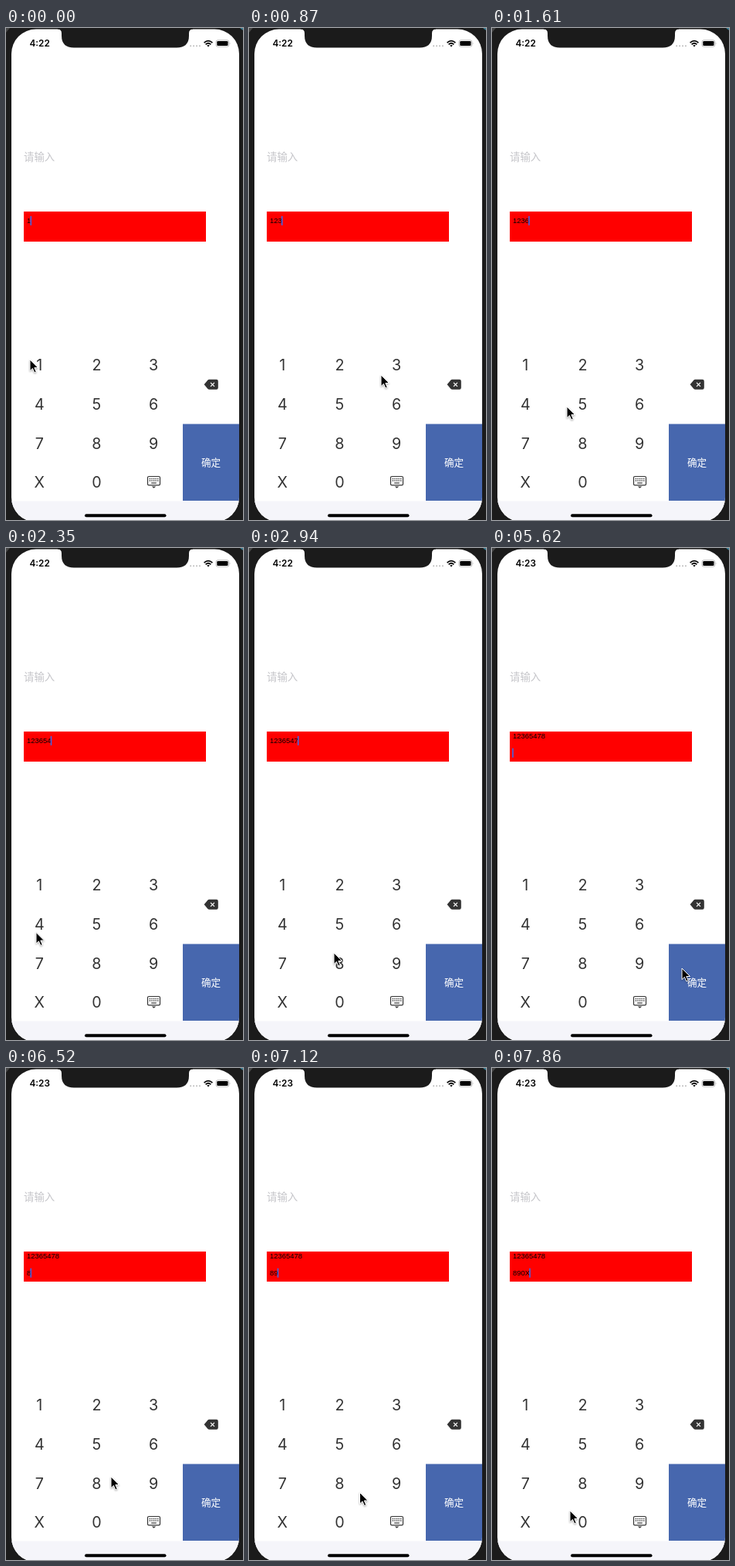
These frames come from a looping animation (307x638 px, 8 s). An HTML page:

```html
<!DOCTYPE html>
<html lang="zh">
<head>
<meta charset="utf-8">
<title>Number keypad</title>
<style>
  html, body { margin: 0; width: 100%; height: 100%; overflow: hidden; background: #1b1b1b; }
  svg { display: block; width: 307px; height: 638px; }
  text { font-family: Inter, Roboto, sans-serif; }
  .cjk { font-family: "Noto Sans CJK SC", "Noto Sans CJK", sans-serif; }
  .key { font-size: 19.7px; fill: #333; text-anchor: middle; }
  .entry { font: 9.44px "Liberation Sans", Arial, sans-serif; }
  #pointer { filter: drop-shadow(0 1px 1px rgba(0, 0, 0, .35)); }
</style>
</head>
<body>
<svg viewBox="0 0 307 638">
  <defs>
    <clipPath id="screen"><rect x="7" y="1.5" width="295" height="639" rx="32"/></clipPath>
    <clipPath id="field"><rect x="23" y="238" width="236" height="39"/></clipPath>
  </defs>

  <path d="M0 0H5L0 6Z" fill="#444"/>
  <path d="M303 0h4v3z" fill="#3a7f95"/>

  <g clip-path="url(#screen)">
    <rect width="307" height="638" fill="#fff"/>
    <rect y="613.5" width="307" height="27" fill="#f5f5fa"/>
    <rect x="229" y="513.5" width="74" height="99.5" fill="#4767ae"/>
  </g>
  <path d="M67 0V1.5Q72 1.5 72 7V10Q72 25.5 88 25.5H221Q237 25.5 237 10V7Q237 1.5 242 1.5V0Z" fill="#1b1b1b"/>

  <!-- status bar -->
  <text id="clock" x="30.5" y="24.2" font-size="11.8" font-weight="600">4:22</text>
  <path d="M239.2 23.2h.01m3.9 0h.01m3.9 0h.01m3.9 0h.01" stroke="#bbb" stroke-width="2" stroke-linecap="round"/>
  <g fill="none" stroke="#000" stroke-width="1.7">
    <path d="M256.6 19.2Q262 14.2 267.4 19.2M258.6 21.3Q262 18.2 265.4 21.3"/>
    <path d="M260.2 22.6Q262 21.2 263.8 22.6L262 24.4Z" fill="#000" stroke="none"/>
  </g>
  <rect x="272" y="15.8" width="16.8" height="8.4" rx="2.3" fill="none" stroke="#aaa" stroke-width=".8"/>
  <rect x="273.3" y="17.1" width="14.2" height="5.8" rx="1.2"/>
  <path d="M289.8 18.5q1.4 1.5 0 3z" fill="#aaa"/>

  <text class="cjk" x="23" y="172" font-size="13.4" fill="#c5c5c9">请输入</text>

  <!-- input field -->
  <rect x="23" y="238" width="236" height="39" fill="#f00"/>
  <g clip-path="url(#field)">
    <g id="content">
      <text class="entry" id="first" x="27" y="253.4"></text>
      <text class="entry" id="last" x="27" y="275.2"></text>
      <rect id="caret" width="1.6" height="12" fill="#3f66e8"/>
    </g>
  </g>

  <!-- keypad -->
  <g id="keys"></g>
  <path d="M256.6 462.2L261.2 456.8Q262 455.8 263.3 455.8H272.6Q274.8 455.8 274.8 458V466.5Q274.8 468.7 272.6 468.7H263.3Q262 468.7 261.2 467.7Z" fill="#333"/>
  <path d="M265 459.8l5 5m0-5l-5 5" stroke="#fff" stroke-width="1.2"/>
  <rect x="183.5" y="581.5" width="16" height="11.3" rx="1.6" fill="#fff" stroke="#333" stroke-width="1.2"/>
  <path d="M185.8 584.5h11.6M185.8 587h11.6" stroke="#333" stroke-width="1.3" stroke-dasharray="1.3 1.275"/>
  <path d="M188.2 590h6.6" stroke="#333" stroke-width="1.2"/>
  <path d="M188.8 594.4h5.4l-2.7 2.4z" fill="#333"/>
  <text class="cjk" x="265.5" y="567.6" font-size="12.6" font-weight="500" fill="#fff" text-anchor="middle">确定</text>
  <rect x="102" y="630.3" width="105.5" height="4" rx="2"/>

  <path id="pointer" d="M0 0V14.6L3.4 11.4L5.9 17L8.2 16L5.8 10.5H10.5Z" stroke="#fff" stroke-width="1" stroke-linejoin="round"/>
</svg>

<script>
const $ = id => document.getElementById(id);

$("keys").innerHTML = [..."123456789X0"].map((k, i) =>
  `<text class="key" x="${[43.3, 117.4, 191][i % 3]}" y="${444.4 + 50.6 * (i / 3 | 0)}">${k}</text>`).join("");

// [step, x, y] of the pointer tip
const path = [
  [0, 31, 430], [2, 98, 432], [5, 171, 434], [6, 171, 450], [8, 170, 490],
  [11, 97, 491], [12, 97, 494], [15, 39, 497], [17, 39, 500], [18, 40, 520],
  [19, 46, 523], [20, 110, 525], [24, 112, 525], [28, 245, 545], [30, 246, 545],
  [39, 246, 545], [42, 126, 532], [43, 124, 531], [44, 136, 530], [46, 165, 529],
  [47, 165, 531], [49, 122, 570], [50, 106, 574], [51, 60, 575], [52, 60, 575], [53, 101, 574]
];

// [step, typed character]
const typed = [
  [0, "1"], [2, "2"], [5, "3"], [8, "6"], [12, "5"], [16, "4"], [19, "7"], [21, "8"],
  [33, "\n"], [37, "\n"], [43, "8"], [47, "9"], [50, "0"], [53, "X"]
];

// The screen refreshes in discrete steps of roughly 148 ms.
const stepAt = t => Math.floor(t < 4420 ? t / 147.2 + .11 : 30.05 + (t - 4420) / 149.5);

function pointerAt(n) {
  const i = path.findIndex(p => p[0] >= n);
  if (i < 0) return path[path.length - 1].slice(1);
  if (!i) return path[0].slice(1);
  const [a, b] = [path[i - 1], path[i]], k = (n - a[0]) / (b[0] - a[0]);
  return [1, 2].map(j => a[j] + (b[j] - a[j]) * k);
}

function draw(t) {
  const n = stepAt(t);
  const lines = typed.filter(e => e[0] <= n).map(e => e[1]).join("").split("\n");
  const row = lines.length - 1;
  $("first").textContent = lines[0];
  $("last").textContent = lines[2] || "";

  const width = row === 1 ? 0 : $(row ? "last" : "first").getComputedTextLength();
  $("caret").setAttribute("x", 26.2 + width);
  $("caret").setAttribute("y", 243.9 + 10.9 * row);
  $("caret").setAttribute("visibility", n > 25 && n < 30 || n === 40 || n === 41 ? "hidden" : "visible");

  const scroll = n < 37 ? 0 : n < 38 ? 1.5 : 6;
  $("content").setAttribute("transform", `translate(0 ${-scroll})`);
  $("clock").textContent = n < 37 ? "4:22" : "4:23";
  $("pointer").setAttribute("transform", `translate(${pointerAt(n)})`);
}

function tick() {
  draw(performance.now() % 8000);
  requestAnimationFrame(tick);
}
tick();
</script>
</body>
</html>
```
